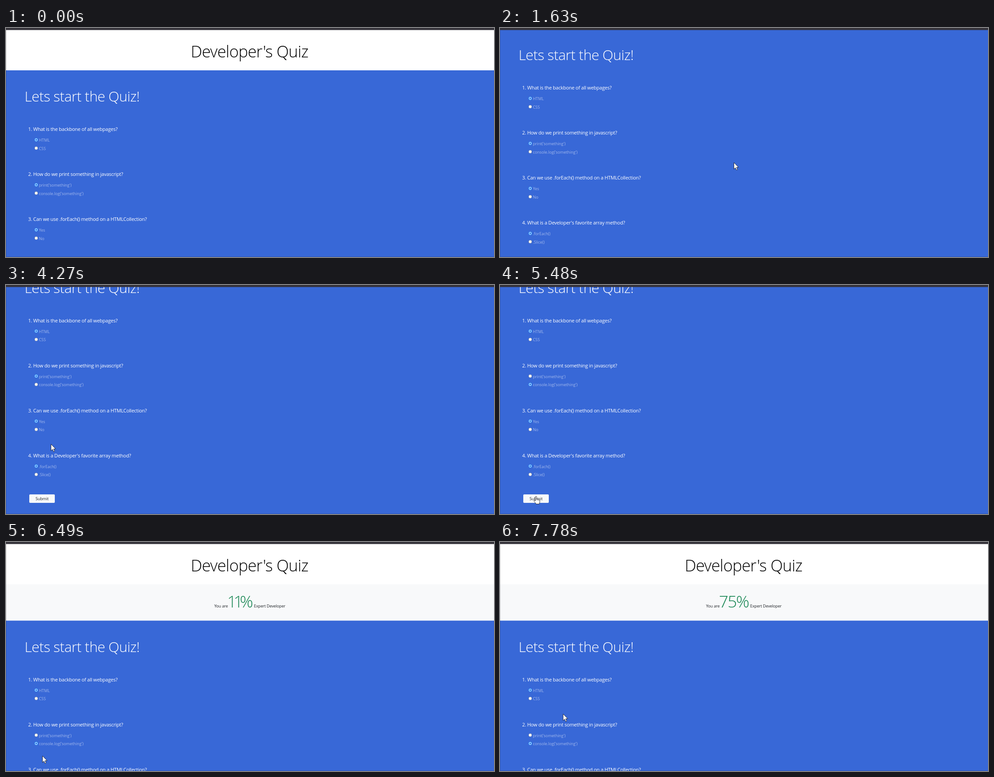
Animation, 1090 px wide and 514 px high, one loop 8 s. Source, as an HTML page:

```html
<!DOCTYPE html>
<html lang="en">
<head>
<meta charset="utf-8">
<title>Developer's Quiz</title>
<style>
  html, body { margin: 0; width: 100%; height: 100%; overflow: hidden; background: #3868d7; }
  svg { display: block; width: 1090px; height: 514px; font-family: "Open Sans", "Noto Sans", sans-serif; }
  text { white-space: pre; }
  .title { font-size: 36px; font-weight: 300; letter-spacing: -.6px; text-anchor: middle; fill: #000; }
  .start { font-size: 31.8px; font-weight: 300; letter-spacing: -.6px; fill: #fff; }
  .question { font-size: 11px; letter-spacing: -.25px; fill: #fff; }
  .label { font-size: 9px; letter-spacing: -.05px; fill: #a2b8ec; }
  .small { font-size: 9px; letter-spacing: -.15px; text-anchor: middle; fill: #212529; }
  .score { font-size: 37px; font-weight: 300; letter-spacing: -2px; fill: #198754; }
  .one { letter-spacing: -7px; }
  .radio .rim { fill: #fff; stroke: #8a8a8a; stroke-width: .6; }
  .radio .dot { fill: none; }
  .radio.on .rim { stroke: #1592ff; stroke-width: 1; }
  .radio.on .dot { fill: #1a6fe8; }
  .radio.pressed .rim { fill: #e4e4e4; }
  #arrow, #hand { fill: #fff; stroke: #1c1c24; stroke-width: .9; stroke-linejoin: round; }
</style>
</head>
<body>
<svg viewBox="0 0 1090 514">
  <rect width="1090" height="514" fill="#3868d7"/>
  <g id="page">
    <rect width="1090" height="95" fill="#fff"/>
    <text class="title" x="544" y="66">Developer's Quiz</text>
    <g id="result">
      <rect y="95" width="1090" height="81.5" fill="#f8f9fa"/>
      <text class="small" x="544.5" y="146.5">You are<tspan class="score" id="score" dx="-1.5"></tspan><tspan dx="1.5"> Expert Developer</tspan></text>
    </g>
    <g id="quiz">
      <text class="start" x="41.6" y="165">Lets start the Quiz!</text>
      <g id="questions"></g>
      <rect x="52" y="617.5" width="57" height="19" rx="2" fill="#f8f9fa"/>
      <text class="small" x="80.5" y="630.5">Submit</text>
    </g>
  </g>
  <rect width="1090" height="4.6" fill="#35333a"/>
  <path d="M.5 5V513.5H1090" fill="none" stroke="#000" stroke-opacity=".16"/>
  <g id="cursor">
    <path id="arrow" d="M0 0V14.8L3.4 11.7 5.7 16.9 8 15.9 5.8 10.8H10.4Z"/>
    <g id="hand" transform="translate(-5.4 -.5)">
      <path d="M4 10.5V1.8a1.4 1.4 0 0 1 2.8 0V7c1-.8 2.3-.4 2.5.5 1-.6 2-.2 2.3.6 1-.5 2.2.1 2.2 1.3V13c0 1.5-1 2.5-1.3 4.5H5.3C4.9 15.5 2.5 13.5.9 11.3 .1 10 1.8 8.8 2.9 9.7Z"/>
      <path d="M6.8 7V9.4M9.3 7.5V9.6M11.6 8.1V9.8" fill="none" stroke-width=".7"/>
    </g>
  </g>
</svg>
<script>
const LOOP = 8000, FIRST = 70, STEP = 78;
const BAND = 81.5, BOTTOM = 147.5;
const PRESS = 4860, PICK = 5020, SUBMIT = 6212;
const $ = id => document.getElementById(id);

const quiz = [
  ["What is the backbone of all webpages?", "HTML", "CSS"],
  ["How do we print something in javascript?", "print('something')", "console.log('something')"],
  ["Can we use .forEach() method on a HTMLCollection?", "Yes", "No"],
  ["What is a Developer's favorite array method?", ".forEach()", ".Slice()"]
];

// Pointer moves: start, end, x, y, sideways bow
const moves = [
  [70, 790, 636, 294], [1000, 1630, 522.5, 302], [1630, 1780, 480, 307],
  [1850, 2170, 307, 416], [2400, 2870, 71, 491.5], [2880, 3430, 75.5, 481.5],
  [3980, 4770, 69.5, 226, 28], [5020, 5450, 80.5, 474.5], [5480, 5720, 76.5, 469.5],
  [6020, 6300, 81.5, 480], [6490, 7710, 141, 386]
];

const progress = (a, b, t) => Math.min(1, Math.max(0, (t - a) / (b - a)));
const smooth = f => f * f * (3 - 2 * f);
const easeOut = f => f * (2 - f);

function pointer(t) {
  let x = 977, y = 468;
  for (const [a, b, toX, toY, bow = 0] of moves) {
    const f = easeOut(progress(a, b, t));
    x += (toX - x) * f + bow * Math.sin(Math.PI * f);
    y += (toY - y) * f;
  }
  return [x, y];
}

const option = (text, y, on) => `
  <g class="radio${on ? " on" : ""}">
    <circle class="rim" cx="67.5" cy="${y}" r="3.4"/>
    <circle class="dot" cx="67.5" cy="${y}" r="1.9"/>
  </g>
  <text class="label" x="73.4" y="${y + 4}">${text}</text>`;

$("questions").innerHTML = quiz.map(([ask, first, second], i) => `
  <g transform="translate(0 ${i * 101})">
    <text class="question" x="49.4" y="231">${i + 1}. ${ask}</text>
    ${option(first, 251, true)}${option(second, 269.7, false)}
  </g>`).join("");

const radios = document.querySelectorAll(".radio");
const show = (el, on) => el.setAttribute("display", on ? "inline" : "none");
const move = (el, x, y) => el.setAttribute("transform", `translate(${x} ${y})`);
const digits = n => [...`${n}%`].map(c => `<tspan${c === "1" ? ' class="one"' : ""}>${c}</tspan>`).join("");

function draw(t) {
  // The screen refreshes in even steps; clicks land at once
  const tick = t < FIRST ? 0 : t - (t - FIRST) % STEP;
  const done = tick >= SUBMIT;
  const shift = done ? BAND : 0;
  const scroll = done
    ? (BOTTOM + BAND) * (1 - smooth(progress(SUBMIT, SUBMIT + 185, tick)))
    : BOTTOM * smooth(progress(1416, 1780, tick));
  move($("page"), 0, -scroll);
  move($("quiz"), 0, shift);

  show($("result"), done);
  const score = Math.floor((tick - 6250) / 19.5);
  $("score").innerHTML = digits(Math.max(0, Math.min(75, score)));

  const picked = t >= PICK;
  radios[2].classList.toggle("on", !picked);
  radios[3].classList.toggle("on", picked);
  radios[3].classList.toggle("pressed", t >= PRESS && !picked);

  const [x, y] = pointer(tick);
  const top = 617.5 + shift - scroll;
  const over = x > 52 && x < 109 && y > top && y < top + 19;
  show($("cursor"), t >= FIRST);
  show($("hand"), over);
  show($("arrow"), !over);
  move($("cursor"), x, y);
}

const start = performance.now();
function frame() {
  draw((performance.now() - start) % LOOP);
  requestAnimationFrame(frame);
}
frame();
</script>
</body>
</html>
```
